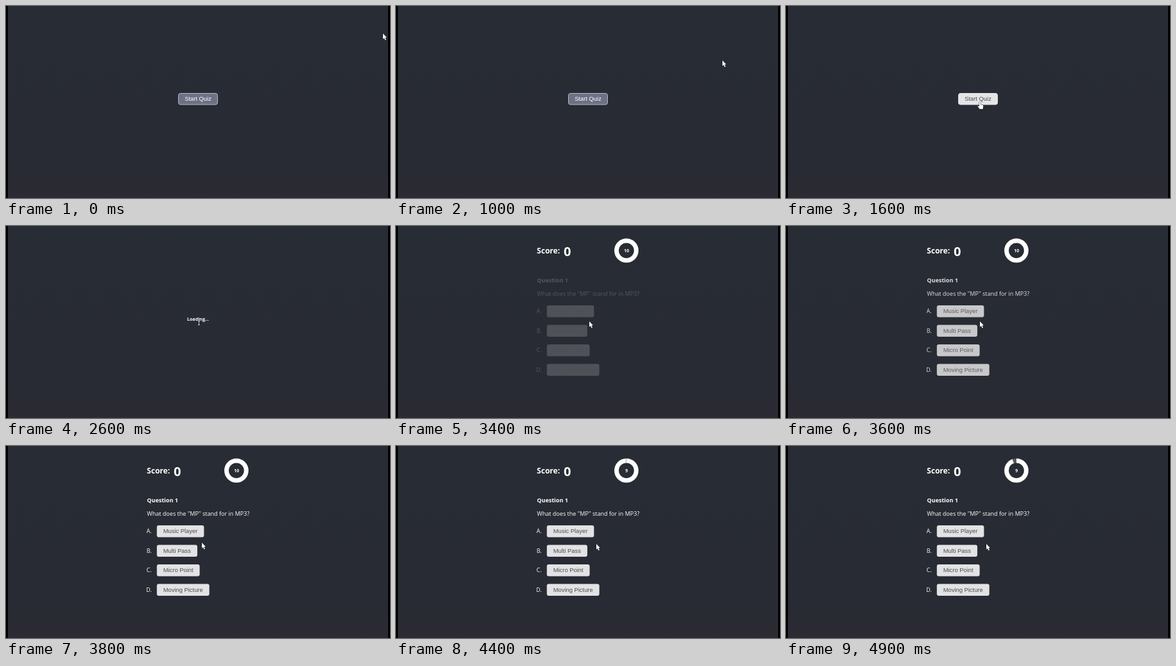
Animation, 600 px wide and 300 px high, one loop 5000 ms. Source, as an HTML page with a canvas:

```html
<!DOCTYPE html>
<html lang="en">
<head>
<meta charset="utf-8">
<title>Quiz</title>
<style>
html, body { margin: 0; width: 100%; height: 100%; overflow: hidden; background: #000; }
canvas { display: block; width: 600px; height: 300px; }
</style>
</head>
<body>
<canvas id="stage"></canvas>
<script>
const LOOP = 5000, TICK = 100;
const SANS = '"Open Sans", "Noto Sans", sans-serif';
const ARIAL = '9.4px "Liberation Sans", Arial, sans-serif';
const canvas = document.getElementById('stage');
const ctx = canvas.getContext('2d');
const ratio = window.devicePixelRatio || 1;
canvas.width = 600 * ratio;
canvas.height = 300 * ratio;

// Pointer path: time, x, y
const path = [
  [700, 589, 43], [800, 582, 46], [900, 555, 60], [1000, 510, 85],
  [1100, 460, 112], [1200, 412, 135], [1300, 374, 148], [1400, 335, 153],
  [1500, 307, 151], [1600, 302, 149], [3500, 302, 149], [3600, 303, 149],
  [3800, 306, 151], [3900, 310, 153], [4000, 313, 153]
];
const answers = ['Music Player', 'Multi Pass', 'Micro Point', 'Moving Picture'];

const clamp = v => Math.max(0, Math.min(1, v));
const mix = (a, b, k) => a + (b - a) * k;
const blend = (a, b, k) => `rgb(${a.map((v, i) => Math.round(mix(v, b[i], k)))})`;

// The CSS "ease" curve, cubic-bezier(.25, .1, .25, 1)
function ease(x) {
  const curve = (a, b, u) => 3 * a * u * (1 - u) ** 2 + 3 * b * u * u * (1 - u) + u ** 3;
  let lo = 0, hi = 1;
  for (let i = 0; i < 20; i++) {
    const mid = (lo + hi) / 2;
    if (curve(.25, .25, mid) < x) lo = mid; else hi = mid;
  }
  return curve(.1, 1, lo);
}

function pointerAt(t) {
  const i = path.findIndex(p => p[0] > t);
  if (i === 0) return path[0].slice(1);
  if (i < 0) return path[path.length - 1].slice(1);
  const a = path[i - 1], b = path[i], k = (t - a[0]) / (b[0] - a[0]);
  return [mix(a[1], b[1], k), mix(a[2], b[2], k)];
}

function text(str, x, y, font, color = '#fff', align = 'left') {
  ctx.font = font;
  ctx.fillStyle = color;
  ctx.textAlign = align;
  ctx.fillText(str, x, y);
}

function box(x, y, w, h, fill, line) {
  ctx.beginPath();
  ctx.roundRect(x, y, w, h, 3);
  ctx.fillStyle = fill;
  ctx.fill();
  if (line) {
    ctx.strokeStyle = line;
    ctx.lineWidth = 1;
    ctx.stroke();
  }
}

function shape(d, x, y) {
  ctx.save();
  ctx.translate(x, y);
  const p = new Path2D(d);
  ctx.lineJoin = 'round';
  ctx.lineWidth = .9;
  ctx.strokeStyle = '#15161a';
  ctx.stroke(p);
  ctx.fillStyle = '#fff';
  ctx.fill(p);
  ctx.restore();
}

function background() {
  ctx.fillStyle = '#000';
  ctx.fillRect(0, 0, 600, 300);
  const g = ctx.createLinearGradient(0, 0, 0, 300);
  g.addColorStop(0, '#282c34');
  g.addColorStop(.85, '#282b33');
  g.addColorStop(1, '#2c2a33');
  ctx.fillStyle = g;
  ctx.fillRect(3, 0, 594, 300);
}

function startScreen(t) {
  const k = clamp((t - 1430) / 120);
  box(269.5, 136.5, 61, 17.5, blend([109, 113, 134], [229, 228, 230], k),
    blend([184, 187, 200], [229, 228, 230], k));
  text('Start Quiz', 300, 148.3, ARIAL, blend([255, 255, 255], [76, 76, 79], k), 'center');
}

function timer(t) {
  const cx = 360, cy = 38.3, top = -Math.PI / 2;
  const gone = Math.max(0, t - 4350) / 10000 * 2 * Math.PI;
  const arc = (from, to, color) => {
    ctx.beginPath();
    ctx.arc(cx, cy, 15.4, from, to);
    ctx.lineWidth = 7;
    ctx.strokeStyle = color;
    ctx.stroke();
  };
  if (gone) arc(top - gone - .02, top, '#5b5b5c');
  arc(top, top + 2 * Math.PI - gone, '#fff');
  text(t < 4400 ? '10' : '9', cx + .2, 41, `bold 7px ${SANS}`, '#fff', 'center');
}

function quizScreen(t) {
  text('Score:', 220, 43.4, `bold 12.1px ${SANS}`);
  text('0', 262, 47, `bold 20px ${SANS}`);
  timer(t);
  ctx.globalAlpha = ease(clamp((t - 3320) / 500));
  text('Question 1', 220.3, 87.8, `bold 9px ${SANS}`);
  text('What does the "MP" stand for in MP3?', 220.3, 109.4, `9.05px ${SANS}`);
  answers.forEach((label, i) => {
    const y = 133.2 + i * 30.5;
    text('ABCD'[i] + '.', 227.6, y + 3.2, `9.05px ${SANS}`, '#fff', 'right');
    ctx.font = ARIAL;
    box(235.7, y - 9.2, ctx.measureText(label).width + 20, 18.4, '#e3e2e4');
    text(label, 245.7, y + 3.2, ARIAL, '#4b4b4e');
  });
  ctx.globalAlpha = 1;
}

function pointer(t) {
  const [x, y] = pointerAt(t);
  if (t >= 1500 && t < 2600) {
    shape('M0 1Q.9-.4 1.8 1V4.4L5.4 5.2Q6.4 5.6 6.3 7L5.5 11.4H.7L-2.4 7.6Q-2.6 6.4-1.4 6.6L0 7.8Z', x, y + .5);
  } else if (t >= 2600 && t < 3400) {
    shape('M-1.7 0H1.7V.8H.4V6.2H1.7V7H-1.7V6.2H-.4V.8H-1.7Z', x - .5, y - 1);
  } else {
    shape('M0 0V8.8L2 7L3.5 10.4L5 9.8L3.5 6.5L6 6.2Z', x, y);
  }
}

function draw(t) {
  ctx.setTransform(ratio, 0, 0, ratio, 0, 0);
  background();
  if (t < 2600) startScreen(t);
  else if (t < 3400) text('Loading...', 300, 148, `bold 7.1px ${SANS}`, '#fff', 'center');
  else quizScreen(t);
  pointer(t);
}

const begin = performance.now();
function frame() {
  const t = (performance.now() - begin) % LOOP;
  draw(Math.floor(t / TICK) * TICK);
  requestAnimationFrame(frame);
}
frame();
</script>
</body>
</html>
```
